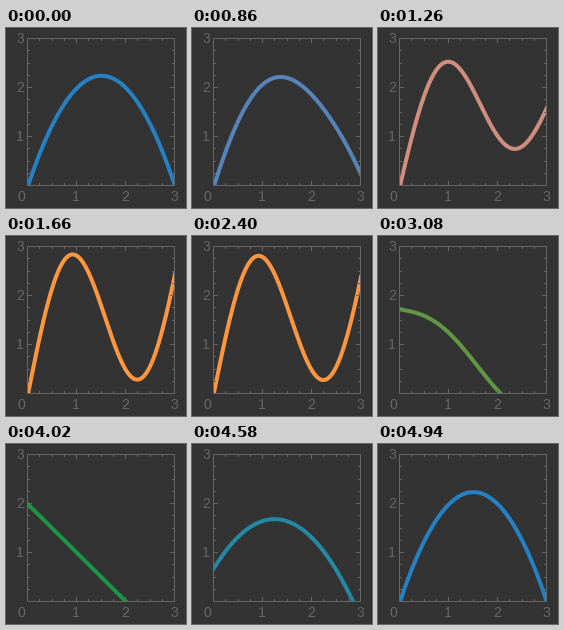
Recreate the animation shown at these times as a matplotlib script. Size 180 px wide and 180 px high, loop 4.98 s.

```python
import numpy as np
import matplotlib.pyplot as plt
from matplotlib.animation import FuncAnimation
from matplotlib.patches import Rectangle

SIZE, DPI = 180, 72
UNIT, LEFT, BOTTOM = 49, 22, 158
BACK, GRAY = "#333333", "#666666"

INTERVAL = 20
HOLD, LEG = 35, 83          # frames at rest, frames per rest and morph
STEPS = 25                  # morph steps of two frames each

CURVES = [
    (lambda x: x * (3 - x), (38, 129, 196)),
    (lambda x: x + 2 * np.sin(2 * x), (255, 150, 64)),
    (lambda x: 2 - x, (28, 150, 68)),
]


def px(x):
    return LEFT + UNIT * x


def py(y):
    return BOTTOM - UNIT * y


def mix(a, b, s):
    return (1 - s) * a + s * b


def mix_light(c0, c1, s):
    """Blend two colours by light intensity rather than by stored value."""
    a, b = np.array(c0) / 255, np.array(c1) / 255
    return tuple(np.sqrt(mix(a ** 2, b ** 2, s)))


def pixel(v):
    """Centre of the pixel that a thin line at v falls on."""
    return np.floor(v - 0.5) + 0.5


fig = plt.figure(figsize=(SIZE / DPI, SIZE / DPI), dpi=DPI, facecolor=BACK)
ax = fig.add_axes([0, 0, 1, 1])
ax.set(xlim=(0, SIZE), ylim=(SIZE, 0))
ax.axis("off")


def segment(x0, y0, x1, y1):
    ax.plot([x0, x1], [y0, y1], color=GRAY, lw=1, snap=False,
            solid_capstyle="butt", zorder=3)


def label(x, baseline, text):
    ax.text(x, baseline, text, color=GRAY, size=14, family="Liberation Sans",
            ha="center", va="baseline")


def draw_frame():
    left, right = pixel(px(0)), pixel(px(3))
    top, bottom = pixel(py(3)), pixel(py(0))
    ax.add_patch(Rectangle((left, top), right - left, bottom - top, fill=False,
                           ec=GRAY, lw=1, snap=False, zorder=3))
    for i in range(1, 12):
        size = 4.5 if i % 4 == 0 else 2.5
        x, y = pixel(px(i / 4)), pixel(py(i / 4))
        segment(x, bottom, x, bottom - size)
        segment(x, top, x, top + size)
        segment(left, y, left + size, y)
        segment(right, y, right - size, y)
    label(15, 173, "0")
    for v in (1, 2, 3):
        label(px(v) - 1, 173, str(v))
        label(14, py(v) + 4, str(v))


draw_frame()
xs = np.linspace(0, 3, 301)
curve, = ax.plot([], [], lw=4, solid_joinstyle="round", zorder=2)
inside = Rectangle((px(0), py(3)), 3 * UNIT - 1, 3 * UNIT - 1,
                   transform=ax.transData)
curve.set_clip_path(inside)


def update(n):
    leg, k = divmod(n, LEG)
    step = 0 if k < HOLD else (k - HOLD) // 2 + 1
    s = (1 - np.cos(np.pi * step / STEPS)) / 2
    f, c0 = CURVES[leg]
    g, c1 = CURVES[(leg + 1) % len(CURVES)]
    curve.set_data(px(xs), py(mix(f(xs), g(xs), s)))
    curve.set_color(mix_light(c0, c1, s))
    return curve,


anim = FuncAnimation(fig, update, frames=LEG * len(CURVES), interval=INTERVAL,
                     repeat=True, repeat_delay=0)
plt.show()
```
